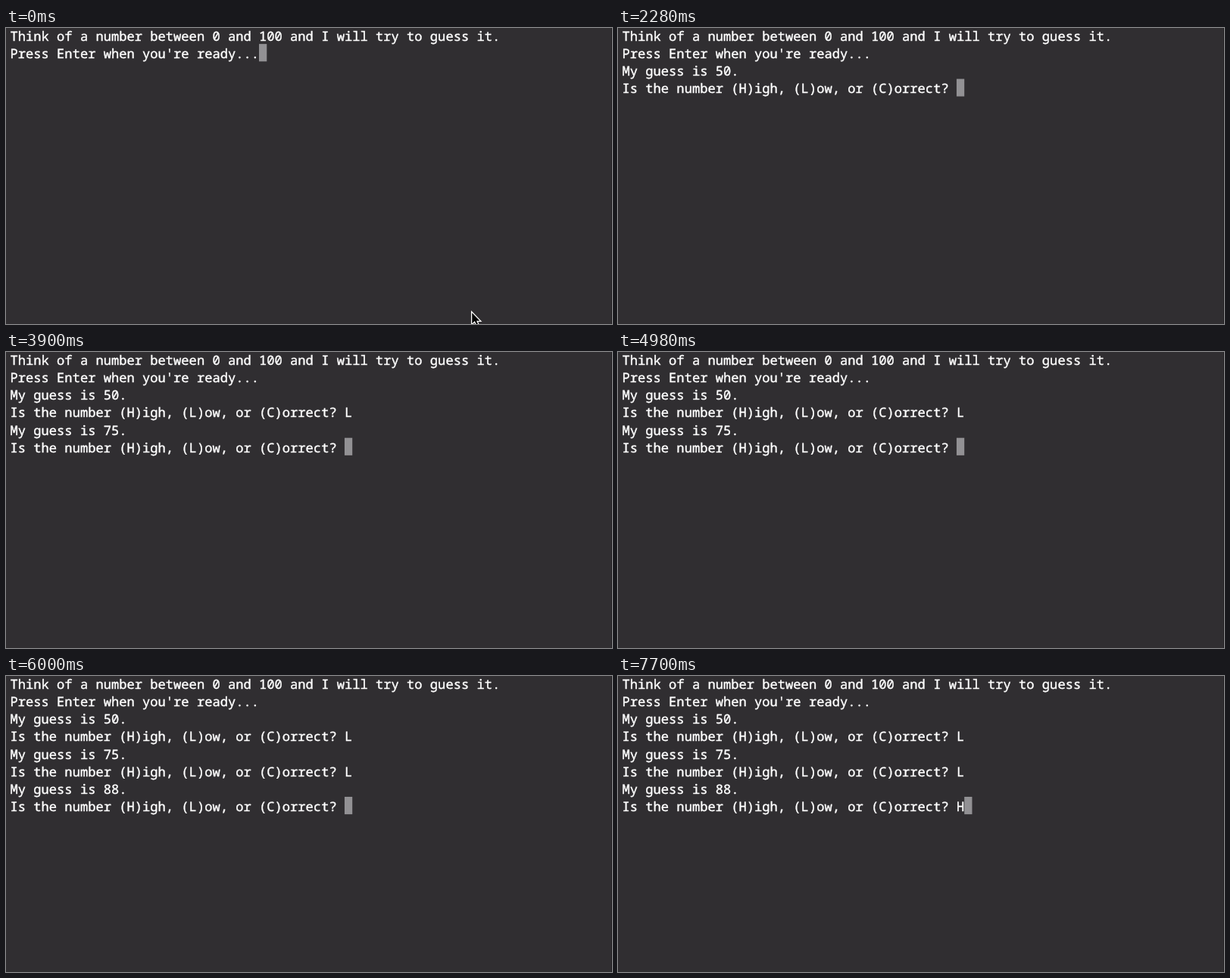
Write an HTML page that moves like this. It is 800 px wide and 392 px high and loops after 8 s.

```html
<!DOCTYPE html>
<html lang="en">
<head>
<meta charset="utf-8">
<title>Guess the number</title>
<style>
  html, body { margin: 0; height: 100%; overflow: hidden; background: #302e31; }
  svg { display: block; }
  text {
    font: 500 17.11px "Noto Sans Mono", "DejaVu Sans Mono", monospace;
    font-variant-ligatures: none;
    text-rendering: geometricPrecision;
    white-space: pre;
    fill: #fff;
    stroke: #fff;
    stroke-width: .4px;
  }
</style>
</head>
<body>
<svg width="800" height="392" viewBox="0 0 800 392">
  <rect x="799" width="1" height="392" fill="#262427"/>
  <rect id="caret" width="10.27" height="23.14" fill="#929194"/>
  <g id="lines"></g>
  <path id="pointer" d="M614.6 375.6V393l4-3.8 2.6 6 3.4-1.4-2.5-5.5h4.8z"
        fill="#000" stroke="#fff" stroke-width="1.3"/>
</svg>
<script>
const LOOP = 8000, LEFT = 5.5, CHAR = 10.266, TOP = -2, ROW = 23.14, BASELINE = 19;
const SVG = "http://www.w3.org/2000/svg";
const [caret, lines, pointer] = ["caret", "lines", "pointer"].map(id => document.getElementById(id));

const ask = guess => `\nMy guess is ${guess}.\nIs the number (H)igh, (L)ow, or (C)orrect? `;

// Terminal output and keystrokes: [time in ms, appended text]
const session = [
  [0, "Think of a number between 0 and 100 and I will try to guess it.\nPress Enter when you're ready..."],
  [300, ask(50)],
  [3600, "L"],
  [3900, ask(75)],
  [5700, "L"],
  [6000, ask(88)],
  [7700, "H"],
];

let shown = "";

function render(content) {
  const rows = content.split("\n");
  lines.replaceChildren(...rows.map((row, i) => {
    const text = document.createElementNS(SVG, "text");
    text.setAttribute("x", LEFT);
    text.setAttribute("y", TOP + i * ROW + BASELINE);
    text.textContent = row;
    return text;
  }));
  caret.setAttribute("x", LEFT + rows.at(-1).length * CHAR);
  caret.setAttribute("y", TOP + (rows.length - 1) * ROW);
}

function frame() {
  const time = performance.now() % LOOP;
  const content = session.filter(([start]) => start <= time).map(([, text]) => text).join("");
  if (content !== shown) render(shown = content);
  pointer.style.display = time < 300 ? "" : "none";
  requestAnimationFrame(frame);
}
frame();
</script>
</body>
</html>
```
